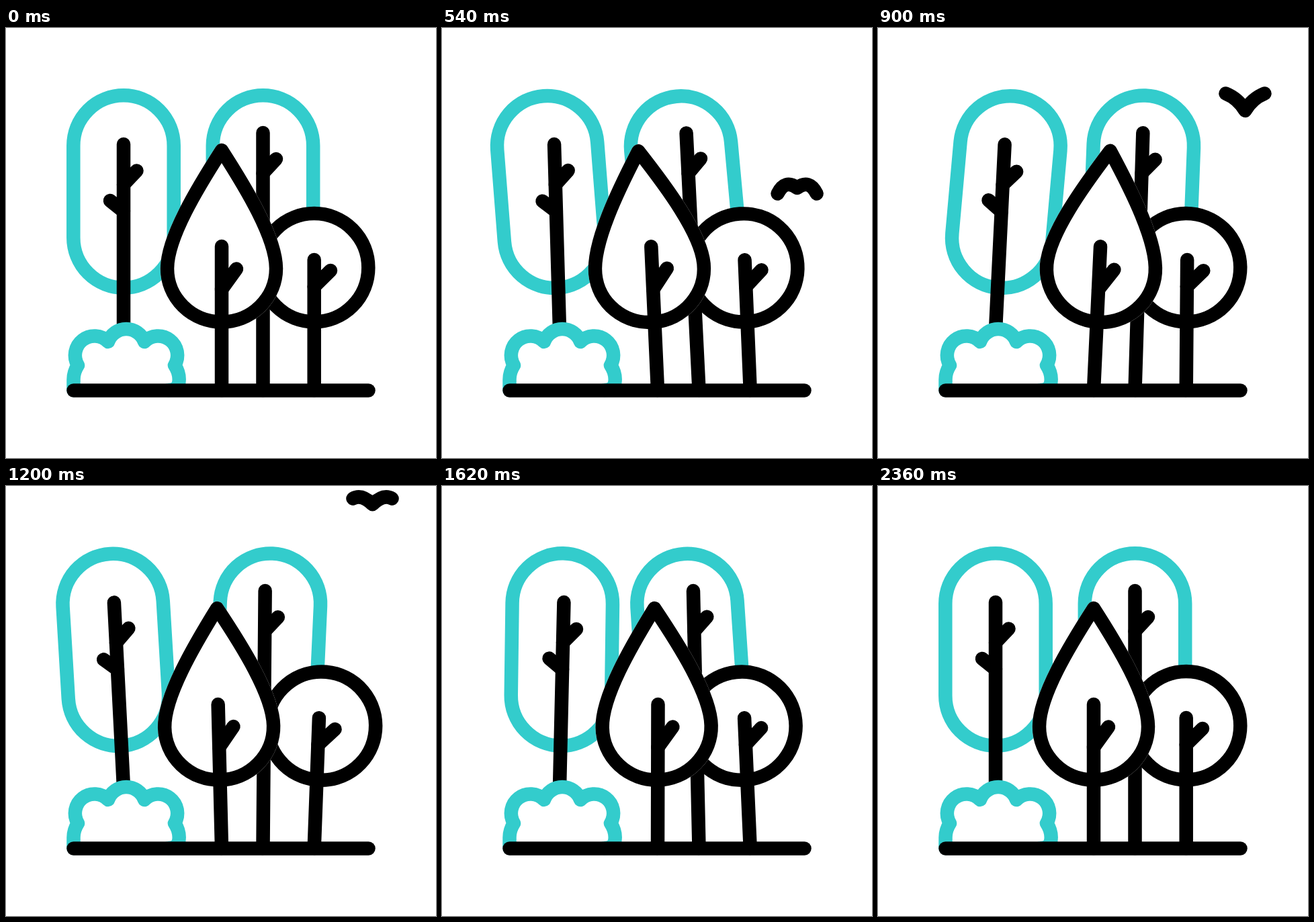
Animation of 640x640 px, one loop 2400 ms. Source, as an HTML page with a canvas:

```html
<!DOCTYPE html>
<html lang="en">
<head>
<meta charset="utf-8">
<title>Trees in the wind</title>
<style>
  html, body { margin: 0; width: 100%; height: 100%; overflow: hidden; background: #fff; }
  canvas { display: block; width: 640px; height: 640px; }
</style>
</head>
<body>
<canvas id="stage" width="640" height="640"></canvas>
<script>
const ctx = document.getElementById('stage').getContext('2d');
const LOOP = 2400, STEP = 20, LINE = 20.5;
const TEAL = '#33cccc', BLACK = '#000', WHITE = '#fff';

// Sway in degrees over time; every part follows it with its own delay.
const SWAY = [[0, 0], [400, -2.85], [875, 2.9], [1265, -3.4], [1720, 2], [2040, 0]];

function sway(t) {
  if (t <= 0) return 0;
  for (let i = 1; i < SWAY.length; i++) {
    const [t0, a] = SWAY[i - 1], [t1, b] = SWAY[i];
    if (t < t1) {
      const u = (t - t0) / (t1 - t0);
      return a + (b - a) * u * u * (3 - 2 * u);
    }
  }
  return 0;
}

function capsule(x) {
  const p = new Path2D();
  p.arc(x, 175, 74.7, Math.PI, 0);
  p.arc(x, 312, 74.7, 0, Math.PI);
  p.closePath();
  return p;
}

function disc(x, y, r) {
  const p = new Path2D();
  p.arc(x, y, r, 0, 2 * Math.PI);
  return p;
}

const drop = new Path2D(
  'M321 182 C357 238 402 312 402 358 A81 79.5 0 0 1 240 358 C240 312 285 238 321 182 Z');

const bush = new Path2D(
  'M100.5 539 V523 Q100.5 512 107 502 A28.7 28.7 0 0 1 152 467 ' +
  'A28.7 28.7 0 0 1 206 467 A28.7 28.7 0 0 1 251 502 ' +
  'Q257.7 512 257.7 523 Q257.7 539 242 539');

// Branches are [tipX, tipY, rootY]; "hinge" is where the crown turns on the trunk,
// "lag" how far the crown trails behind it.
const trees = [
  { x: 175, top: 173, base: 449, hinge: 387, delay: 0, lag: 120, color: TEAL,
    crown: capsule(175), branches: [[194.5, 212.5, 233], [155, 257, 273]] },
  { x: 382.5, top: 156, base: 539, hinge: 387, delay: 160, lag: 80, color: TEAL,
    crown: capsule(382.5), branches: [[402, 195, 216]] },
  { x: 458.7, top: 345, base: 539, hinge: 437, delay: 240, lag: 80, color: BLACK,
    crown: disc(458.7, 356.7, 80.6), branches: [[483, 361, 385]] },
  { x: 321, top: 325, base: 539, hinge: 437, delay: 80, lag: 80, color: BLACK,
    crown: drop, branches: [[343, 358.5, 389]], cutout: true }
];

function turn(x, y, degrees) {
  ctx.translate(x, y);
  ctx.rotate(degrees * Math.PI / 180);
  ctx.translate(-x, -y);
}

function stroke(path, color) {
  ctx.strokeStyle = color;
  ctx.stroke(path);
}

function line(x0, y0, x1, y1) {
  const p = new Path2D();
  p.moveTo(x0, y0);
  p.lineTo(x1, y1);
  stroke(p, BLACK);
}

function drawTree(tree, t) {
  const { x, top, base, hinge, delay, lag, color, crown, branches, cutout } = tree;
  ctx.save();
  turn(x, base, sway(t - delay));

  ctx.save();
  turn(x, hinge, sway(t - delay - lag));
  ctx.fillStyle = WHITE;
  ctx.fill(crown);
  if (cutout) stroke(crown, WHITE);
  stroke(crown, color);
  ctx.restore();

  line(x, top, x, base);
  for (const [tipX, tipY, rootY] of branches) line(tipX, tipY, x, rootY);
  ctx.restore();
}

function drawBird(t) {
  const x = 547.8 - 8e-5 * (t - 1030) ** 2;
  const y = 238 - 0.3195 * (t - 540);
  if (y < -60) return;
  const tip = -8.5 - 17 * Math.cos(2 * Math.PI * (t - 900) / 80);
  const lift = (8 - tip) / 34;
  const bendX = 18 - 8 * lift * lift, bendY = -13.5 - 4.5 * lift;
  const p = new Path2D();
  p.moveTo(x - 29, y + tip);
  p.quadraticCurveTo(x - bendX, y + bendY, x, y);
  p.quadraticCurveTo(x + bendX, y + bendY, x + 29, y + tip);
  stroke(p, BLACK);
}

function draw(t) {
  ctx.fillStyle = WHITE;
  ctx.fillRect(0, 0, 640, 640);
  ctx.lineWidth = LINE;
  ctx.lineCap = ctx.lineJoin = 'round';

  // The bird starts out hidden behind the round tree.
  const [tall, back, round, front] = trees;
  drawTree(tall, t);
  drawTree(back, t);
  drawBird(t);
  drawTree(round, t);
  drawTree(front, t);

  ctx.fillStyle = WHITE;
  ctx.fill(bush);
  stroke(bush, TEAL);
  line(100.5, 539.5, 539.5, 539.5);
}

let start;
function frame(now) {
  start ??= now;
  const t = (now - start) % LOOP;
  draw(Math.floor(t / STEP) * STEP);
  requestAnimationFrame(frame);
}
draw(0);
requestAnimationFrame(frame);
</script>
</body>
</html>
```
